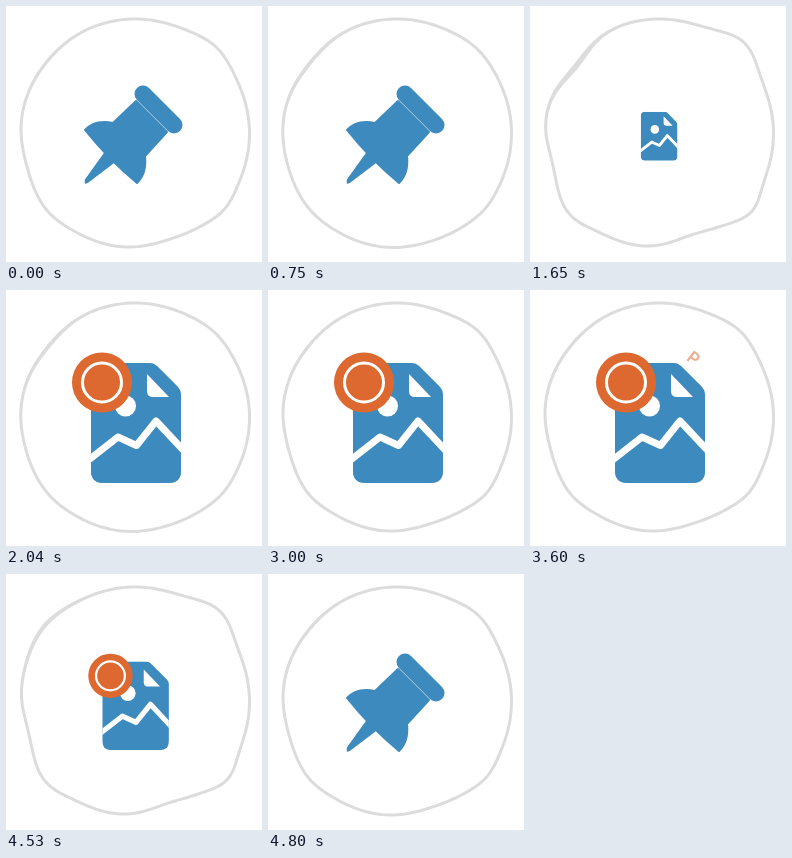
Recreate the animation shown at these times as an HTML page. Size 256 px wide and 256 px high, loop 4950 ms.

```html
<!DOCTYPE html>
<html lang="en">
<head>
<meta charset="utf-8">
<title>Pin to picture</title>
<style>
  html, body { margin: 0; width: 100%; height: 100%; overflow: hidden; background: #fff; }
  svg { display: block; width: 100vw; height: 100vh; }
  .blue { fill: #3d8bbe; stroke: #3d8bbe; }
  .orange { fill: #dd6930; }
  #letter { font: 600 17px Inter, sans-serif; }
</style>
</head>
<body>
<svg viewBox="0 0 256 256">
  <defs>
    <clipPath id="sheet">
      <path id="sheetShape" d="M96 73H144Q148 73 151 76L172 97Q175 100 175 104V181Q175 193 163 193H97Q85 193 85 181V84Q85 73 96 73Z"/>
    </clipPath>
  </defs>

  <path id="outline" fill="none" stroke="#dcdcdc" stroke-width="3"/>

  <g id="pin" class="blue" stroke-linejoin="round" stroke-linecap="round">
    <path d="M137 88L168 119" stroke-width="17"/>
    <path d="M130 95L107 117Q89 113 79 124Q103 154 131 177Q141 167 139 150L161 126Z" stroke-width="2"/>
    <path d="M101 144L79.500 174V177L82 176L111 154Z" stroke-width="1.500"/>
  </g>

  <g id="file">
    <g clip-path="url(#sheet)">
      <use href="#sheetShape" class="blue" stroke="none"/>
      <path d="M141 84L163 107H147Q141 107 141 101Z" fill="#fff"/>
      <circle cx="119.500" cy="116" r="10.500" fill="#fff"/>
      <path d="M80 172L112 147L130.500 155.500L150 131L180 163" fill="none" stroke="#fff" stroke-width="7" stroke-linejoin="round"/>
    </g>
    <g id="badge">
      <circle class="orange" cx="96" cy="92.500" r="30"/>
      <circle cx="96" cy="92.500" r="19.500" fill="none" stroke="#fff" stroke-width="3"/>
    </g>
  </g>

  <text id="letter" class="orange" transform="translate(155.500 69.500) rotate(38)">P</text>
</svg>

<script>
const LOOP = 4950, TICK = 30, WOBBLE = 150;
const $ = id => document.getElementById(id);

// A wobbly circle: rough scales its shared bumps, shoulder dents the upper left.
const rings = [
  { rough: 0.4, shoulder: -1 },
  { rough: 0.2, shoulder: -3 },
  { rough: 0.95, shoulder: 4 },
  { rough: 1, shoulder: -9 }
].map(({ rough, shoulder }) => ringPath(rough, shoulder) + ringPath(rough, shoulder * 0.7));

function hump(angle, centre, width) {
  const gap = (angle - centre + 540) % 360 - 180;
  return Math.exp(-((gap / width) ** 2));
}

function radius(a, rough, shoulder) {
  const bumps = 10 * hump(a, 313, 14) + 7 * hump(a, 40, 11) + 6 * hump(a, 138, 13)
    - 8 * hump(a, 72, 18) - 4 * hump(a, 166, 14);
  return 114.5 + rough * bumps + shoulder * hump(a, 219, 17);
}

function ringPath(rough, shoulder) {
  const points = [];
  for (let a = 0; a < 360; a += 2) {
    const r = radius(a, rough, shoulder), turn = a * Math.PI / 180;
    points.push([129 + r * Math.cos(turn), 127.5 + r * Math.sin(turn)].map(v => v.toFixed(2)));
  }
  return "M" + points.join("L") + "Z";
}

const part = (t, from, to) => Math.min(1, Math.max(0, (t - from) / (to - from)));
const backIn = x => x * x * (2.7 * x - 1.7);
const backOut = x => 1 - backIn(1 - x);
const bump = x => Math.sin(Math.PI * x) ** 2;

function scale(el, s, x = 128.5, y = 128.5) {
  el.setAttribute("visibility", s > 0.001 ? "visible" : "hidden");
  el.setAttribute("transform", `translate(${x} ${y}) scale(${Math.max(s, 0.001)}) translate(${-x} ${-y})`);
}

function pinScale(t) {
  if (t < 1200) return 1 + 0.08 * bump(part(t, 750, 1110));
  if (t < 4620) return 1 - backIn(part(t, 1200, 1620));
  return backOut(part(t, 4590, 4710));
}

function fileScale(t) {
  if (t < 4200) return backOut(part(t, 1620, 1920));
  return 1 - backIn(part(t, 4200, 4620));
}

function letterOpacity(t) {
  const flash = (from, full, fade, to) => part(t, from, full) - part(t, fade, to);
  return flash(2550, 2700, 2700, 2850) + flash(3150, 3270, 3390, 3510) + flash(3540, 3650, 3900, 4020);
}

function draw(time) {
  const t = Math.floor((time % LOOP) / TICK) * TICK;
  $("outline").setAttribute("d", rings[Math.floor(t / WOBBLE) % rings.length]);
  scale($("pin"), pinScale(t));
  scale($("file"), fileScale(t));
  scale($("badge"), fileScale(t) > 0.001 ? backOut(part(t, 1800, 2040)) : 0, 96, 92.5);
  $("letter").setAttribute("opacity", letterOpacity(t));
}

const start = performance.now();
function loop() {
  draw(performance.now() - start);
  requestAnimationFrame(loop);
}
loop();
</script>
</body>
</html>
```
